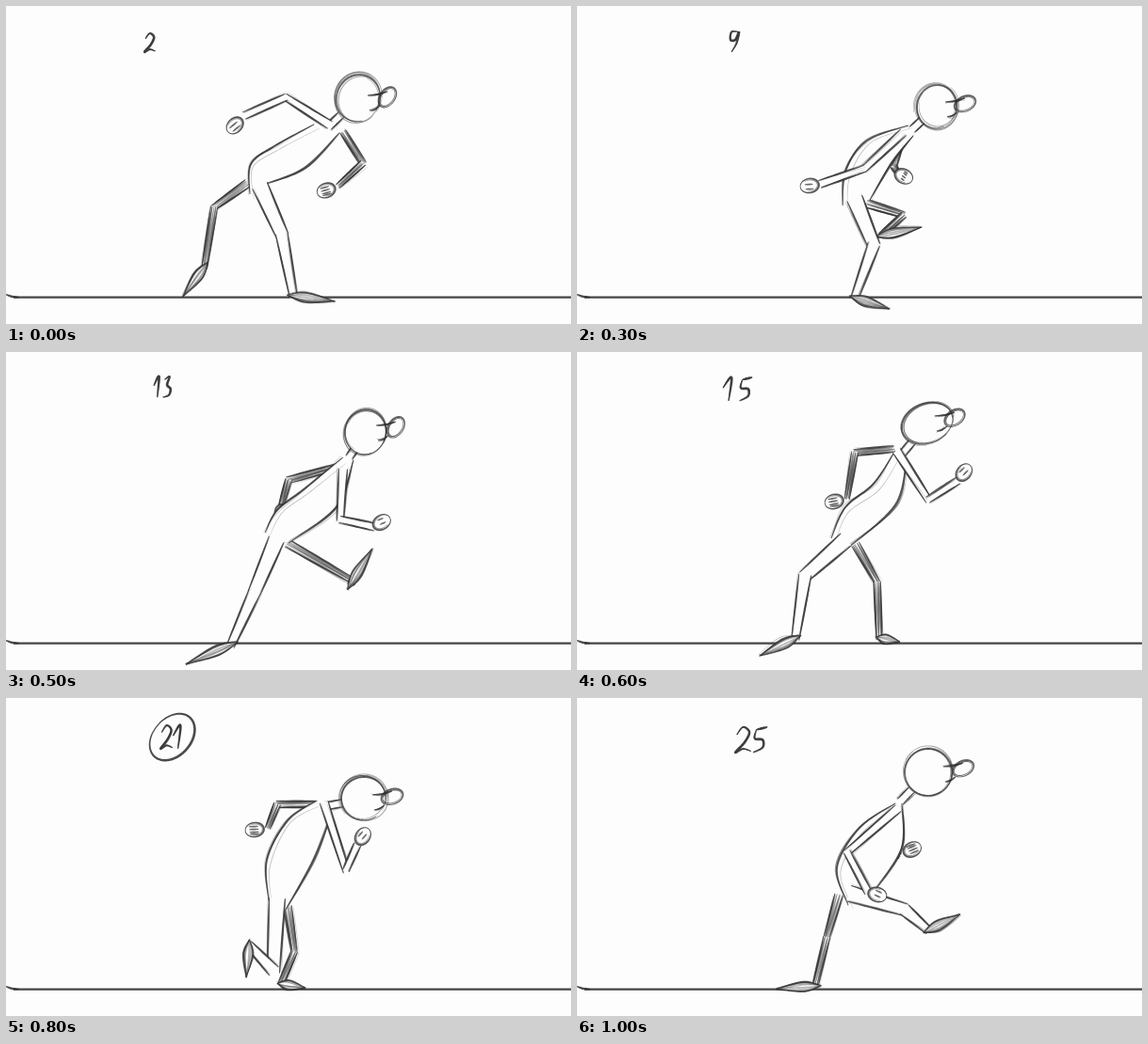
An HTML page with a canvas that plays this animation: 600x338 px, repeating every 1100 ms.

```html
<!DOCTYPE html>
<html lang="en">
<head>
<meta charset="utf-8">
<title>Run cycle</title>
<style>
  html, body { margin: 0; width: 100%; height: 100%; overflow: hidden; background: #fdfdfd; }
  canvas { display: block; width: 100vw; height: 100vh; }
</style>
</head>
<body>
<canvas id="stage" width="600" height="338"></canvas>
<script>
const W = 600, H = 338, LOOP = 1100, STEP = 100;
const INK = '#2c2c2e', PAPER = '#fdfdfd', GROUND = 309.6;

// Key poses as joints. label: text and box. head: centre, radii, tilt. brim: centre, tilt.
// arms: shoulder, elbow, wrist, hand. legs: hip, knee, ankle, toe.
const KEYS = [
  {
    label: ['2', 147, 29, 12, 20], head: [374, 98, 23, 25, 20], brim: [405, 97, -55],
    back: [327, 126, 285, 149, 260, 168, 259, 200], front: [354, 135, 318, 172, 276, 189],
    nearArm: [343, 126, 297, 97, 254, 116, 243, 127], farArm: [358, 134, 379, 167, 353, 191, 340, 196],
    nearLeg: [270, 192, 293, 243, 305, 308, 349, 314], farLeg: [256, 189, 221, 214, 211, 277, 188, 309]
  },
  {
    label: ['5', 156, 27, 16, 21], head: [374, 107, 27, 23, -30], brim: [408, 101, -30],
    back: [334, 121, 305, 141, 282, 168, 268, 193], front: [352, 132, 325, 165, 283, 204],
    nearArm: [345, 120, 291, 108, 240, 132, 227, 131], farArm: [355, 136, 362, 176, 330, 187, 319, 193],
    nearLeg: [276, 193, 299, 247, 294, 309, 332, 318], farLeg: [271, 199, 249, 250, 219, 262, 180, 292]
  },
  {
    label: ['9', 162, 25, 11, 24], head: [382, 107, 21, 23, 10], brim: [412, 104, -25],
    back: [352, 127, 308, 143, 285, 175, 282, 212], front: [357, 138, 335, 166, 311, 206],
    nearArm: [346, 135, 305, 173, 259, 189, 247, 191], farArm: [345, 140, 336, 170, 341, 178, 347, 181],
    nearLeg: [295, 205, 315, 254, 295, 310, 332, 322], farLeg: [308, 210, 347, 222, 323, 244, 366, 235]
  },
  {
    label: ['13', 157, 26, 19, 22], head: [382, 85, 22, 24, 15], brim: [414, 80, -58],
    back: [358, 112, 316, 146, 288, 168, 275, 192], front: [369, 115, 351, 165, 300, 203],
    nearArm: [358, 125, 355, 178, 391, 186, 399, 181], farArm: [352, 122, 300, 136, 292, 164, 293, 172],
    nearLeg: [287, 200, 264, 255, 239, 311, 191, 332], farLeg: [300, 204, 368, 243, 366, 247, 389, 209]
  },
  {
    label: ['15', 155, 27, 32, 25], head: [372, 76, 28, 21, -22], brim: [401, 70, -35],
    back: [338, 105, 315, 140, 285, 165, 270, 198], front: [350, 115, 338, 163, 288, 208],
    nearArm: [340, 106, 373, 157, 404, 137, 411, 128], farArm: [336, 103, 295, 107, 287, 155, 273, 159],
    nearLeg: [285, 200, 242, 238, 232, 304, 194, 323], farLeg: [296, 205, 319, 245, 321, 304, 343, 308]
  },
  {
    label: ['21', 164, 29, 27, 25], ring: true, head: [380, 107, 24, 23, 0], brim: [410, 105, -20],
    back: [330, 109, 299, 130, 277, 172, 279, 216], front: [346, 122, 327, 172, 297, 225],
    nearArm: [338, 112, 361, 183, 373, 156, 379, 147], farArm: [330, 113, 288, 113, 278, 138, 264, 140],
    nearLeg: [288, 214, 284, 290, 258, 262, 255, 297], farLeg: [299, 222, 306, 270, 292, 304, 318, 308]
  },
  {
    label: ['25', 168, 31, 35, 27], head: [373, 79, 25, 25, 0], brim: [410, 75, -27],
    back: [338, 112, 300, 138, 276, 180, 288, 220], front: [345, 112, 345, 160, 316, 205],
    nearArm: [340, 118, 287, 164, 309, 206, 319, 209], farArm: [343, 125, 338, 165, 343, 168, 356, 161],
    nearLeg: [290, 208, 348, 225, 373, 247, 407, 230], farLeg: [278, 210, 265, 255, 253, 306, 212, 309]
  }
];

// Handwritten digits in a unit box, one list per stroke
const DIGITS = {
  1: [[0, .45, .6, 0, .4, 1]],
  2: [[.1, .3, .5, 0, .9, .2, .6, .6, 0, 1, .5, .85, 1, .95]],
  3: [[.2, .15, .8, 0, .5, .4, .9, .6, .7, .9, 0, 1]],
  5: [[.3, .1, .2, .45, .7, .5, .7, .8, .1, 1], [.3, .1, 1, 0]],
  8: [[.8, .1, .2, .1, .2, .35, .8, .65, .5, 1, .1, .8, .8, .1]],
  9: [[.9, .1, .2, .1, .1, .45, .6, .45, .95, .1, .7, .6, .2, 1]]
};

const mix = (a, b, t) => a + (b - a) * t;
const between = (p, q, t) => p.map((v, i) => mix(v, q[i], t));
const pairs = flat => flat.flatMap((v, i) => i % 2 ? [] : [[v, flat[i + 1]]]);
const wrap = a => Math.atan2(Math.sin(a), Math.cos(a));

// Bones as length and bend relative to the bone before
function bones(flat) {
  const pts = pairs(flat);
  let last = 0;
  return pts.slice(1).map(([x, y], i) => {
    const dx = x - pts[i][0], dy = y - pts[i][1], angle = Math.atan2(dy, dx);
    const bend = wrap(angle - last);
    last = angle;
    return [Math.hypot(dx, dy), bend];
  });
}

// Halfway limb: joints swing on arcs
function swing(p, q) {
  let [x, y] = between(p.slice(0, 2), q.slice(0, 2), 0.5), angle = 0;
  const flat = [x, y], next = bones(q);
  bones(p).forEach(([len, bend], i) => {
    const turn = i ? next[i][1] - bend : wrap(next[i][1] - bend);
    angle += bend + turn / 2;
    const r = mix(len, next[i][0], 0.5);
    flat.push(x += r * Math.cos(angle), y += r * Math.sin(angle));
  });
  return flat;
}

function tween(p, q, text) {
  const pose = { label: [text, ...between(p.label.slice(1), q.label.slice(1), 0.5)] };
  for (const k of ['head', 'brim', 'back', 'front']) pose[k] = between(p[k], q[k], 0.5);
  for (const k of ['nearArm', 'farArm', 'nearLeg', 'farLeg']) pose[k] = swing(p[k], q[k]);
  return pose;
}

function seeded(seed) {
  return () => (seed = (seed * 1664525 + 1013904223) >>> 0) / 4294967296;
}

let g, rnd;

// Catmull-Rom samples through the points
function curve(pts, n = 12) {
  const at = i => pts[Math.max(0, Math.min(pts.length - 1, i))];
  const out = [];
  for (let i = 0; i < pts.length - 1; i++) {
    const [a, b, c, d] = [at(i - 1), at(i), at(i + 1), at(i + 2)];
    for (let t = 0; t < 1; t += 1 / n) {
      out.push([0, 1].map(k => b[k] + t * (c[k] - a[k]) / 2 +
        t * t * (a[k] - 2.5 * b[k] + 2 * c[k] - d[k] / 2) +
        t * t * t * (1.5 * (b[k] - c[k]) + (d[k] - a[k]) / 2)));
    }
  }
  return [...out, at(pts.length - 1)];
}

function fill(pts, color, alpha = 1) {
  g.globalAlpha = alpha;
  g.fillStyle = color;
  g.beginPath();
  pts.forEach(p => g.lineTo(...p));
  g.fill();
}

// Tapered stroke drawn as one filled outline
function pencil(pts, width, alpha) {
  const line = curve(pts), left = [], right = [], end = line.length - 1;
  line.forEach(([x, y], i) => {
    const p = line[Math.max(0, i - 1)], q = line[Math.min(end, i + 1)];
    const dx = q[0] - p[0], dy = q[1] - p[1], len = Math.hypot(dx, dy) || 1;
    const r = width / 2 * (0.4 + 0.6 * Math.sin(Math.PI * i / end));
    left.push([x - dy / len * r, y + dx / len * r]);
    right.unshift([x + dy / len * r, y - dx / len * r]);
  });
  fill([...left, ...right], INK, alpha);
}

const shake = (pts, amount) => pts.map(p => p.map(v => v + (rnd() - 0.5) * amount));

// Main line with loose companions
function sketch(pts, width) {
  pencil(pts, width, 0.8);
  pencil(shake(pts, 3), width * 0.55, 0.4);
  pencil(shake(pts, 4.5), width * 0.45, 0.25);
}

function hatch(a, b, count, alpha) {
  for (let i = 0; i < count; i++) {
    const t = (i + 0.5) / count;
    pencil(shake(a.map((p, k) => between(p, b[k], t)), 2), 1.8, alpha);
  }
}

// Point along a to b, moved sideways
function beside(a, b, along, side) {
  const dx = b[0] - a[0], dy = b[1] - a[1], len = Math.hypot(dx, dy) || 1;
  return [a[0] + dx * along - dy / len * side, a[1] + dy * along + dx / len * side];
}

function bone(a, b, wa, wb, far) {
  const edge = s => [beside(a, b, -0.02, s * wa / 2), beside(a, b, 1.03, s * wb / 2)];
  const left = edge(-1), right = edge(1);
  fill([...left, right[1], right[0]], PAPER);
  if (far) hatch(left, right, 5, 0.5);
  sketch(left, far ? 1.7 : 2.2);
  sketch(right, far ? 1.9 : 2);
}

function oval([cx, cy, rx, ry, tilt], grow = 0, from = 0, turn = 6.4) {
  const a = tilt * Math.PI / 180, pts = [];
  for (let i = 0; i <= 16; i++) {
    const t = from + turn * i / 16;
    const x = (rx + grow) * Math.cos(t), y = (ry + grow) * Math.sin(t);
    pts.push([cx + x * Math.cos(a) - y * Math.sin(a), cy + x * Math.sin(a) + y * Math.cos(a)]);
  }
  return pts;
}

function drawArm(flat, far) {
  const [shoulder, elbow, wrist, hand] = pairs(flat);
  bone(shoulder, elbow, far ? 7 : 9, 7, far);
  bone(elbow, wrist, 7, far ? 5 : 8, far);
  const tilt = Math.atan2(hand[1] - wrist[1], hand[0] - wrist[0]) * 180 / Math.PI;
  const palm = [...hand, 10, 7.5, tilt];
  fill(oval(palm), PAPER);
  pencil(oval(palm), 1.9, 0.8);
  pencil(oval(palm, -1.5, 1, 4), 1.2, 0.5);
  for (const s of far ? [-4, -1, 2, 4] : [-2, 3]) {
    pencil([beside(hand, wrist, -0.4, s), beside(hand, wrist, 0.3, s + 1)], 1.8, 0.7);
  }
}

function drawLeg(flat, far) {
  const [hip, knee, ankle, toe] = pairs(flat);
  bone(hip, knee, far ? 9 : 17, far ? 6 : 13, far);
  bone(knee, ankle, far ? 7 : 13, far ? 6 : 8, far);
  const side = s => [beside(ankle, toe, -0.15, 0), beside(ankle, toe, 0.3, s), toe];
  const top = side(-5), sole = side(5);
  fill([...curve(top), ...curve(sole).reverse()], PAPER);
  hatch(top, sole, 5, 0.33);
  sketch(top, 1.7);
  sketch(sole, 2.2);
}

function drawTorso(pose) {
  const back = pairs(pose.back), front = pairs(pose.front);
  fill([...curve(back), ...curve(front).reverse()], PAPER);
  sketch(back, 2.2);
  sketch(front, 2.5);
  pencil(shake(back.map(([x, y]) => [x + 4, y + 4]), 5), 0.9, 0.3);
}

function drawHead({ head, brim: [x, y, tilt], back, front }) {
  const base = between(back.slice(0, 2), front.slice(0, 2), 0.5);
  for (const s of [-4, 4]) sketch([beside(base, head, 0.05, s), beside(base, head, 0.45, s)], 1.8);
  fill(oval(head), PAPER);
  for (let i = 0; i < 5; i++) {
    const loose = [...shake([head.slice(0, 2)], 4)[0], ...head.slice(2)];
    pencil(oval(loose, rnd() * 3 - 1, rnd() * 6, 4.5), 1.2, 0.42);
  }
  pencil(oval(head, 0, 1, 5.5), 2, 0.7);
  for (const grow of [0, -1.5]) pencil(oval([x, y, 12, 8, tilt], grow, 2 + grow), 1.9 + grow / 2, 0.75);
  sketch([[x - 21, y - 2], [x - 10, y - 3], [x, y - 6]], 2.2);
  sketch([[x - 19, y + 14], [x - 14, y + 13], [x - 8, y + 9]], 2);
}

function drawLabel([text, x, y, w, h], ring) {
  const cell = w / text.length;
  [...text].forEach((d, i) => DIGITS[d].forEach(flat => {
    const pts = pairs(flat).map(([u, v]) => [x + (i + u * 0.95) * cell, y + v * h]);
    pencil(pts, 2.7, 0.85);
    pencil(shake(pts, 1.5), 1.5, 0.6);
  }));
  if (ring) pencil(oval([x + w / 2 - 1, y + h / 2, 28, 20, -48], 0, 4.5), 2.7, 0.85);
}

function drawGround() {
  pencil([[0, 306.5], [6, 308.8], [14, GROUND]], 2.4, 0.85);
  fill([[8, GROUND - 1.2], [W, GROUND - 1.2], [W, GROUND + 1.1], [8, GROUND + 1.1]], INK, 0.88);
}

function drawPose(pose, index) {
  const sheet = document.createElement('canvas');
  sheet.width = W;
  sheet.height = H;
  g = sheet.getContext('2d');
  rnd = seeded(index * 97 + 31);
  fill([[0, 0], [W, 0], [W, H], [0, H]], PAPER);
  drawGround();
  drawLabel(pose.label, pose.ring);
  drawLeg(pose.farLeg, true);
  drawArm(pose.farArm, true);
  drawTorso(pose);
  drawLeg(pose.nearLeg, false);
  drawHead(pose);
  drawArm(pose.nearArm, false);
  return sheet;
}

const [reach, drive, pass, push, land, sink, lift] = KEYS;
const sheets = [
  reach, drive, pass, tween(pass, push, '11'), push,
  land, tween(land, sink, '18'), sink, tween(sink, lift, '23'), lift
].map(drawPose);
const view = document.getElementById('stage').getContext('2d');

// The first pose holds for two steps, the rest for one.
function show() {
  const step = Math.floor(performance.now() % LOOP / STEP);
  view.drawImage(sheets[Math.max(0, step - 1)], 0, 0);
  requestAnimationFrame(show);
}
show();
</script>
</body>
</html>
```
